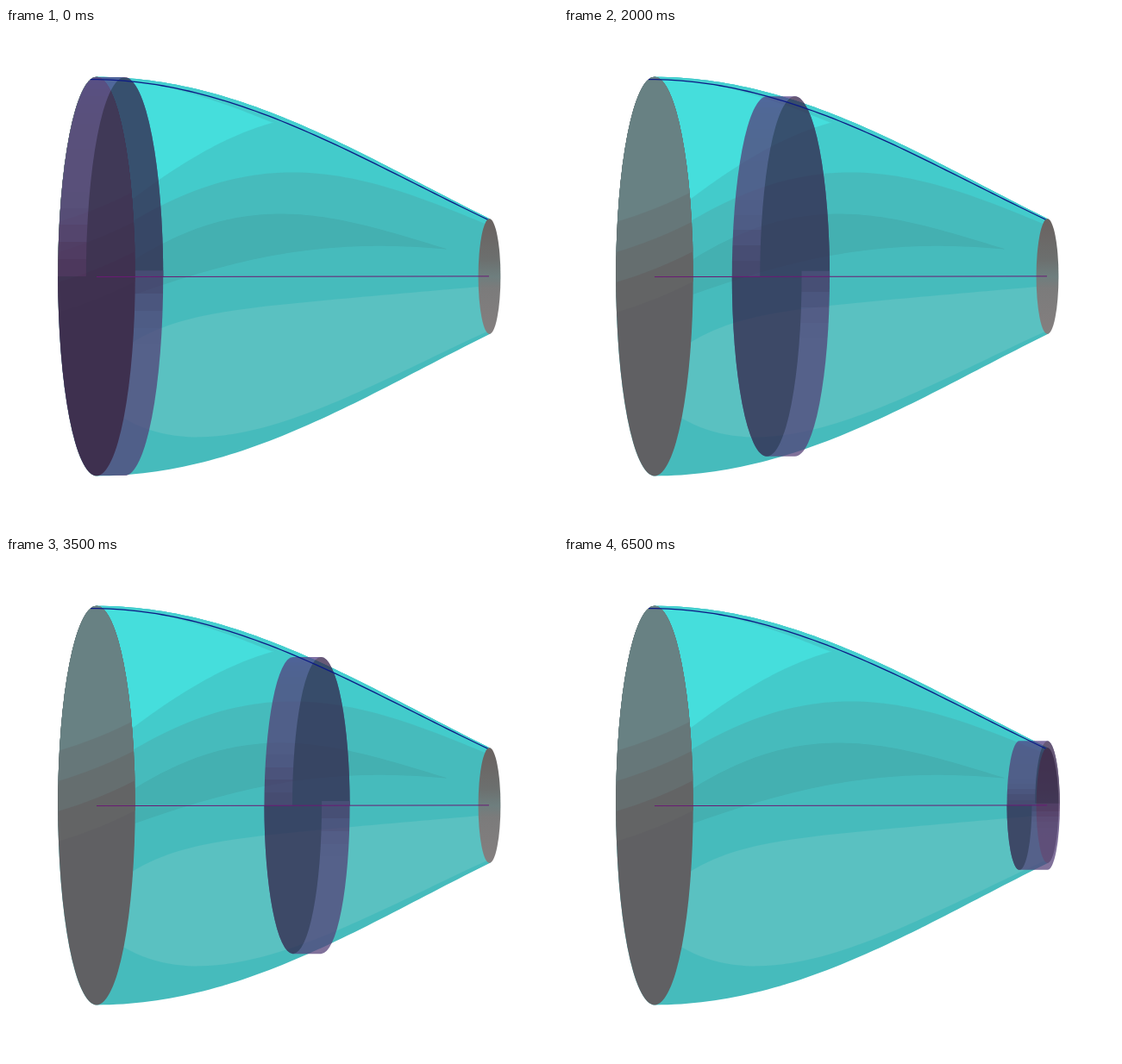
Animation of 640 by 581 pixels, one loop 7000 ms. Source, as an HTML page:

```html
<!DOCTYPE html>
<html lang="en">
<head>
<meta charset="utf-8">
<title>Solid of revolution, disk method</title>
<style>
  html, body { margin: 0; width: 100%; height: 100%; overflow: hidden; background: #fff; }
  svg { display: block; width: 100%; height: 100%; }
</style>
</head>
<body>
<svg viewBox="0 0 640 581">
  <defs>
    <clipPath id="solidClip"><path id="outline"/></clipPath>
    <clipPath id="capClip"><ellipse id="leftCap"/></clipPath>
    <linearGradient id="wallFill" x1="0" y1="0" x2="0" y2="1"></linearGradient>
    <linearGradient id="endFill" x1="0" y1="0" x2="0" y2="1">
      <stop offset="0" stop-color="#6a6260"/>
      <stop offset=".35" stop-color="#6c6f6e"/>
      <stop offset=".5" stop-color="#6e7e7e"/>
      <stop offset=".6" stop-color="#7b7b7b"/>
      <stop offset="1" stop-color="#847f7f"/>
    </linearGradient>
  </defs>
  <g id="surface" clip-path="url(#solidClip)"></g>
  <g id="cap" clip-path="url(#capClip)"></g>
  <ellipse id="rightCap" fill="url(#endFill)"/>
  <g opacity=".74">
    <path id="wall" fill="url(#wallFill)"/>
    <path id="face" fill="#332049"/>
    <path id="notch" fill="#482a5e"/>
  </g>
  <path d="M105 288.6L560 287.9" stroke="#6b1a74"/>
  <path id="profile" fill="none" stroke="#0c1a86" stroke-width="1.3"/>
</svg>
<script>
const $ = id => document.getElementById(id);
const START = 105, LENGTH = 455.5, MID = 288.1, TILT = 0.1935;
const DISKS = 14, STEP = 500, THICK = LENGTH / DISKS;
const AMP = 123.2, FREQ = 0.0042;

const radius = d => 231.3 - AMP * (1 - Math.cos(FREQ * d));
const slope = d => -AMP * FREQ * Math.sin(FREQ * d);
const onRing = (d, cos, side) => [
  START + d + TILT * radius(d) * cos,
  MID - side * radius(d) * Math.sqrt(1 - cos * cos)
];
const sample = (fn, end = 1) => Array.from({ length: 61 }, (_, i) => fn(end * i / 60));
const poly = pts => 'M' + pts.map(p => p.map(v => v.toFixed(2)).join(' ')).join('L');

function area(parent, fill, d) {
  const path = document.createElementNS('http://www.w3.org/2000/svg', 'path');
  path.setAttribute('d', d + 'Z');
  path.setAttribute('fill', fill);
  $(parent).append(path);
}

// Shaded band between two heights, given as fractions of the radius along u = 0..1
function band(fill, top, bottom, end = 1) {
  const edge = height => sample(u => {
    const d = u * LENGTH;
    return [START + d, MID - height(u) * radius(d)];
  }, end);
  area('surface', fill, poly([...edge(top), ...edge(bottom).reverse()]));
}

function ellipse(el, d) {
  const r = radius(d);
  const values = { cx: START + d, cy: MID, rx: r * TILT, ry: r };
  for (const k in values) el.setAttribute(k, values[k]);
}

function drawSolid() {
  const edge = side => sample(d => onRing(d, -TILT * slope(d), side), LENGTH);
  const r0 = radius(0), rx0 = r0 * TILT;
  const profile = poly(sample(d => onRing(d, -0.155, 1), LENGTH));
  $('outline').setAttribute('d', poly([...edge(1), ...edge(-1).reverse()]) +
    `A${rx0} ${r0} 0 0 1 ${START} ${MID - r0}Z`);
  $('profile').setAttribute('d', profile);
  ellipse($('leftCap'), 0);
  ellipse($('rightCap'), LENGTH);

  area('surface', '#46bbbc', 'M0 0H640V581H0');
  band('#43cbcb', u => 1.05, u => .164 + u * (1.32 - .6 * u));
  band('#45dedc', u => 1 - .125 * u, u => .25 + 1.55 * u, .45);
  band('#44b0b1', u => -.047 + u * (1.485 - 1.168 * u), u => -.16 + u * (.72 - .175 * u), .89);
  band('#5ac1c1', u => -.165 - .32 * Math.exp(-7 * u), u => -.94 + .33 * Math.exp(-5.5 * u));
  area('surface', '#44cfcf', profile + 'V0H90');

  area('cap', '#606063', 'M0 0H200V581H0');
  for (let i = 3; i >= 0; i--)
    area('cap', `rgb(${104 - 1.6 * i},${129 - 9.7 * i},${131 - 10 * i})`,
      `M60 ${225 + 35 * i}Q105 ${212 + 35 * i} 150 ${189 + 35 * i}V0H60`);
}

// Facets of the disk wall as hard-edged gradient bands, darkest near the axis
function shadeWall() {
  const facets = 36, at = i => (1 - Math.cos(Math.PI * i / facets)) / 2;
  let stops = '';
  for (let i = 0; i < facets; i++) {
    const y = (at(i) + at(i + 1)) / 2;
    const dip = Math.exp(-(((y - .48) / .1) ** 2));
    const color = `rgb(${84 - 14 * dip},${64 - 26 * dip},${120 - 32 * dip + 16 * Math.exp(-20 * y)})`;
    for (const edge of [at(i), at(i + 1)]) stops += `<stop offset="${edge}" stop-color="${color}"/>`;
  }
  $('wallFill').innerHTML = stops;
}

function drawDisk(k) {
  const r = radius(THICK * (k + .5)), rx = r * TILT;
  const left = START + THICK * k, right = left + THICK;
  const arc = `A${rx} ${r} 0 0 `;
  $('wall').setAttribute('d', `M${left} ${MID + r}${arc}1 ${left} ${MID - r}H${right}` +
    `${arc}1 ${right} ${MID + r}Z`);
  $('face').setAttribute('d', `M${right - rx} ${MID}${arc}1 ${right + rx} ${MID}Z` +
    `M${left - rx} ${MID}${arc}0 ${left + rx} ${MID}Z`);
  $('notch').setAttribute('d', `M${left + rx} ${MID - r * .03}H${right + rx}V${MID}H${left + rx}Z`);
}

let shown = -1;
function frame() {
  const k = Math.floor(performance.now() / STEP) % DISKS;
  if (k !== shown) drawDisk(shown = k);
  requestAnimationFrame(frame);
}

drawSolid();
shadeWall();
frame();
</script>
</body>
</html>
```
